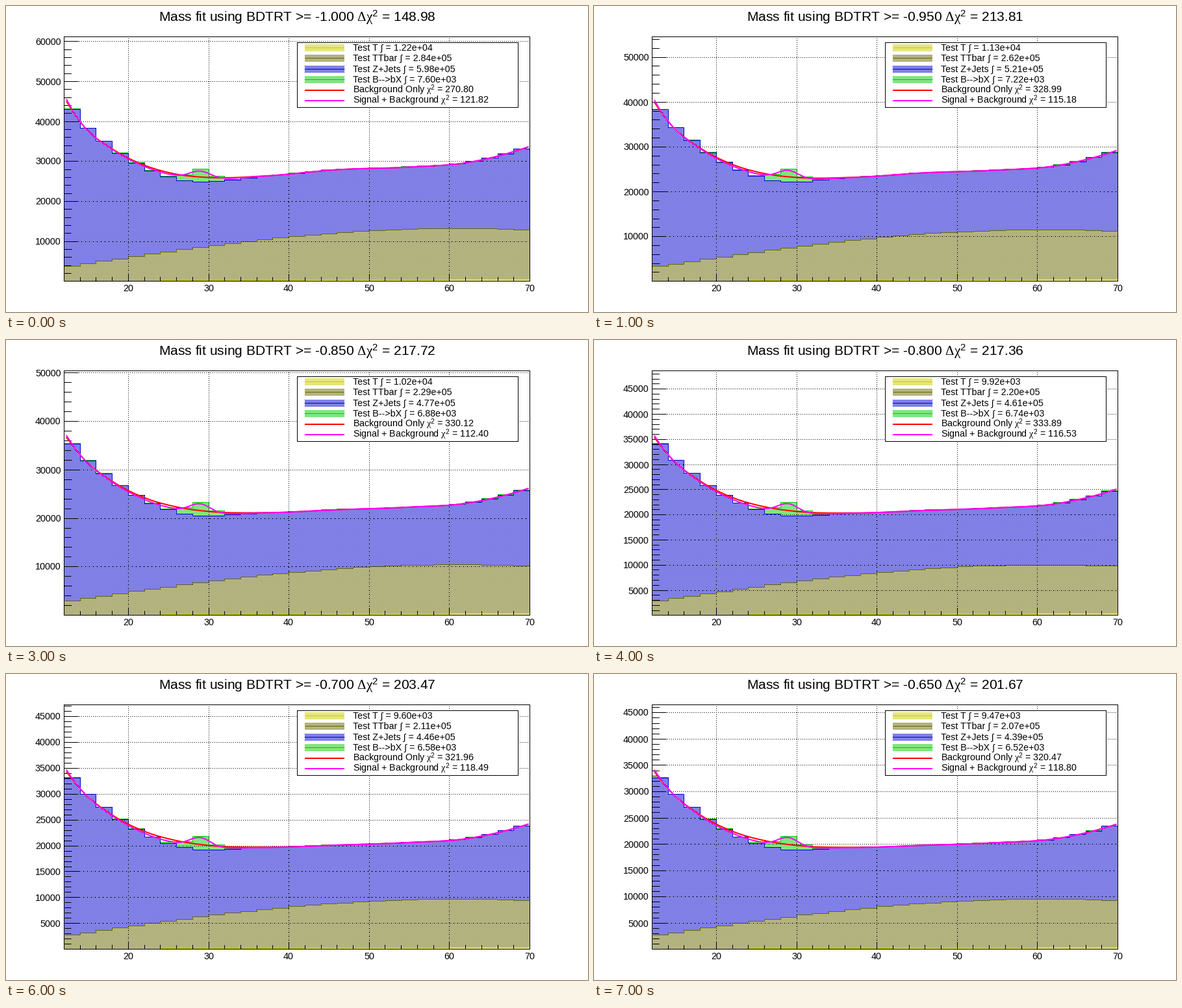
These frames come from a looping animation (896x472 px, 8000 ms). A matplotlib script:

```python
import numpy as np
import matplotlib.pyplot as plt
from matplotlib.animation import FuncAnimation

plt.rcParams.update({
    "font.family": "Liberation Sans",
    "mathtext.fontset": "custom",
    "mathtext.rm": "Liberation Serif",
    "mathtext.it": "Liberation Serif",
    "mathtext.sf": "Liberation Sans",
})

W, H, DPI = 896, 472, 100
PX = 72 / DPI
LEFT, RIGHT, TOP, BASE = 89, 806, 47, 424
BINS = 29
STEP = (RIGHT - LEFT) / BINS
YELLOW, OLIVE, BLUE, GREEN = (204, 204, 0), (102, 102, 0), (0, 0, 204), (0, 204, 0)
RED, MAGENTA, BLACK, WHITE = (255, 0, 0), (255, 0, 255), (0, 0, 0), (255, 255, 255)
CHI = r"$\mathrm{\chi}^{\mathsf{2}}$"
DELTA_CHI = r"$\mathrm{\Delta\chi}^{\mathsf{2}}$"

# T, TTbar, Z+Jets, B, chi2 background, chi2 with signal, top of the axis
SCANS = [
    (1.22e4, 2.84e5, 5.98e5, 7.60e3, 270.80, 121.82, 61250),
    (1.13e4, 2.62e5, 5.21e5, 7.22e3, 328.99, 115.18, 54650),
    (1.06e4, 2.40e5, 4.98e5, 7.03e3, 325.07, 108.81, 52430),
    (1.02e4, 2.29e5, 4.77e5, 6.88e3, 330.12, 112.40, 50450),
    (9.92e3, 2.20e5, 4.61e5, 6.74e3, 333.89, 116.53, 48700),
    (9.74e3, 2.15e5, 4.54e5, 6.65e3, 323.30, 118.19, 48040),
    (9.60e3, 2.11e5, 4.46e5, 6.58e3, 321.96, 118.49, 47300),
    (9.47e3, 2.07e5, 4.39e5, 6.52e3, 320.47, 118.80, 46580),
]

# key points of the background fit for the loosest and the tightest cut
KNOTS = [93, 115, 165, 215, 265, 312, 400, 510, 620, 710, 803]
LOOSE = np.array([147, 180, 221, 246, 259.5, 264, 261.5, 252, 248, 241, 217])
TIGHT = np.array([151, 178, 218, 243, 257, 264, 267, 264, 260, 254, 232])

YY, XX = np.mgrid[0:H, 0:W]
CHECKER = (XX + YY) % 2 == 0
BIN = np.arange(BINS)
CENTERS = LEFT + STEP * (BIN + 0.5)
EDGES = np.round(LEFT + STEP * np.arange(BINS + 1)).astype(int)
COLUMN_BIN = np.clip(((np.arange(W) - LEFT) / STEP).astype(int), 0, BINS - 1)

fig = plt.figure(figsize=(W / DPI, H / DPI), dpi=DPI, facecolor="white")
ax = fig.add_axes([0, 0, 1, 1])


def smooth(x, px, py):
    """Cubic Hermite curve through the points."""
    px = np.array(px, float)
    m = np.gradient(py, px, edge_order=2)
    i = np.clip(np.searchsorted(px, x) - 1, 0, len(px) - 2)
    h = px[i + 1] - px[i]
    t = (x - px[i]) / h
    return ((1 + 2 * t) * (1 - t) ** 2 * py[i] + t * (1 - t) ** 2 * h * m[i]
            + t * t * (3 - 2 * t) * py[i + 1] + t * t * (t - 1) * h * m[i + 1])


def bell(x, center, width):
    return np.exp(-0.5 * ((x - center) / width) ** 2)


def background(x, w):
    return smooth(x, KNOTS, (1 - w) * LOOSE + w * TIGHT)


def with_signal(x, w):
    dip = (2.5 + 1.5 * w) * bell(x, 262, 68)
    peak = (11.5 + 3 * w) * bell(x, 298, 16)
    return background(x, w) + dip - peak - 3 * np.exp((93 - x) / 12)


def hist_tops(w):
    """Pixel rows of the stacked outlines, tallest first."""
    jets = background(CENTERS, w) + 8.5 * bell(BIN, 7.3, 2) - 4.5 * bell(BIN, 1.4, 1.1)
    total = jets - 0.5 - 20 * bell(BIN, 7.95, 0.75)
    ttbar = BASE + 0.5 - (1 - 0.05 * w) * (23.5 + 58 * np.sin(np.pi * BIN / 48))
    single = BASE + 0.5 - (0.4 + 3.2 * BIN / BINS)
    return [np.round(t).astype(int) for t in (total, jets, ttbar, single)]


def hline(img, x0, x1, y, color=BLACK, gap=1):
    img[y, x0:x1 + 1:gap] = color


def vline(img, x, y0, y1, color=BLACK, gap=1):
    img[min(y0, y1):max(y0, y1) + 1:gap, x] = color


def box(img, x0, y0, x1, y1):
    for y in (y0, y1):
        hline(img, x0, x1, y)
    for x in (x0, x1):
        vline(img, x, y0, y1)


def label(x, y, s, size, ha="left"):
    ax.text(x, y, s, fontsize=size * PX, ha=ha, va="baseline")


def paint_stack(img, w):
    inside = CHECKER & (XX >= LEFT) & (XX <= RIGHT) & (YY <= BASE)
    layers = list(zip(hist_tops(w), (GREEN, BLUE, OLIVE, YELLOW)))
    for tops, color in layers:
        img[inside & (YY >= tops[COLUMN_BIN])] = color
    for tops, color in layers:
        for k in range(BINS):
            hline(img, EDGES[k], EDGES[k + 1], tops[k], color)
            if k:
                vline(img, EDGES[k], tops[k - 1], tops[k], color)


def paint_axes(img, top):
    major = 10000 if top > 50000 else 5000
    for v in range(0, top + 1, major // 5):
        y = int(BASE + 0.8 - v * (BASE + 0.8 - TOP) / top)
        big = v % major == 0
        hline(img, LEFT, LEFT + (22 if big else 11), y)
        if big and v:
            hline(img, LEFT, RIGHT, y, gap=3)
            label(84, y + 5, str(v), 14.4, "right")
    for v in range(12, 71, 2):
        x = EDGES[(v - 12) // 2]
        big = v % 10 == 0
        vline(img, x, BASE - (11 if big else 6), BASE)
        if big:
            label(x - 0.5, 440, str(v), 14.4, "center")
            vline(img, x, TOP, BASE, gap=3)
    box(img, LEFT, TOP, RIGHT, BASE)


def paint_legend(img, scan):
    img[56:157, 448:789] = WHITE
    box(img, 448, 56, 788, 156)
    rows = [int(64 + 16.5 * k) for k in range(6)]
    names = ("T", "TTbar", "Z+Jets", "B-->bX")
    for y, name, total, color in zip(rows, names, scan, (YELLOW, OLIVE, BLUE, GREEN)):
        swatch = CHECKER & (abs(YY - y) <= 5) & (XX >= 460) & (XX <= 520)
        img[swatch] = color
        hline(img, 460, 520, y, color)
        label(533, y + 4, f"Test {name} \u222b = {total:.2e}", 14.2)
    fits = ("Background Only", "Signal + Background")
    for y, name, chi2, color in zip(rows[4:], fits, scan[4:], (RED, MAGENTA)):
        img[y - 1:y + 1, 460:521] = color
        label(533, y + 4, f"{name} {CHI} = {chi2:.2f}", 14.2)


def draw(i):
    scan = SCANS[i]
    w = 1 - np.exp(-0.5 * i)
    ax.clear()
    ax.axis("off")

    img = np.full((H, W, 3), 255, np.uint8)
    paint_stack(img, w)
    paint_axes(img, scan[6])
    paint_legend(img, scan)
    ax.imshow(img, interpolation="nearest", aspect="auto")

    x = np.linspace(93, 803, 100)
    for curve, color in ((background, "red"), (with_signal, "magenta")):
        ax.plot(x, curve(x, w), color=color, lw=2 * PX)
    cut, delta = -1 + 0.05 * i, scan[4] - scan[5]
    label(448, 23, f"Mass fit using BDTRT >= {cut:.3f} {DELTA_CHI} = {delta:.2f}", 21, "center")

    ax.set_xlim(-0.5, W - 0.5)
    ax.set_ylim(H - 0.5, -0.5)
    return []


anim = FuncAnimation(fig, draw, frames=len(SCANS), init_func=lambda: [],
                     interval=1000, repeat=True, repeat_delay=0)
plt.show()
```
